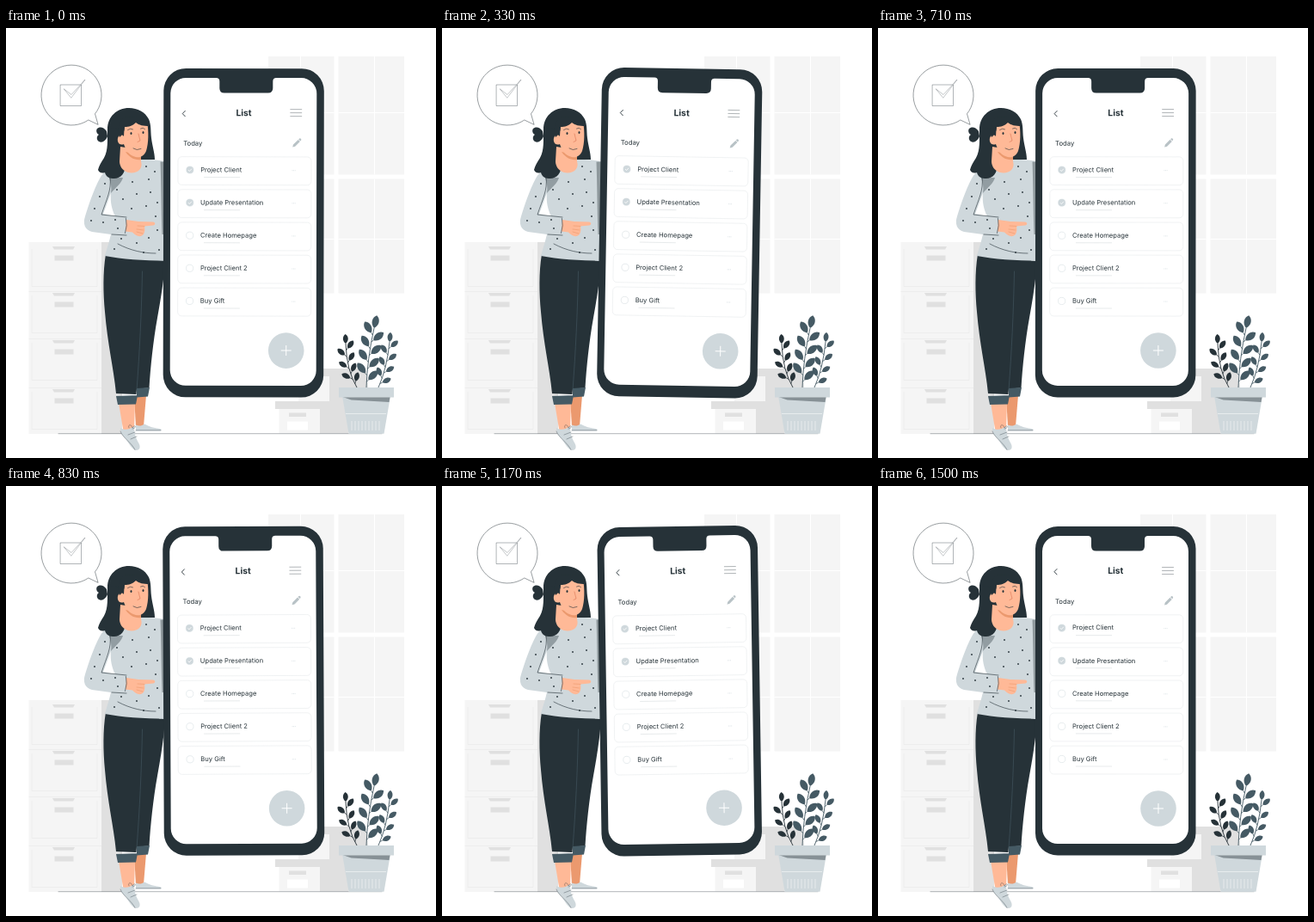
These frames come from a looping animation (500x500 px, 1540 ms). An HTML page:

```html
<!DOCTYPE html>
<html lang="en">
<head>
<meta charset="utf-8">
<title>To-do list</title>
<style>
html, body { margin: 0; width: 100%; height: 100%; overflow: hidden; background: #fff; }
svg { display: block; width: 100vw; height: 100vh; }
text { font: 7.6px Inter, "Open Sans", sans-serif; fill: #263238; text-rendering: geometricPrecision; }
.dark { fill: #263238; }
.slate { fill: #455a64; }
.blue { fill: #cfd8dc; }
.pale { fill: #f5f5f5; }
.grey { fill: #e0e0e0; }
.skin { fill: #ffb997; }
.shade { fill: #eb996e; }
.white { fill: #fff; }
.line { fill: none; stroke: #263238; stroke-width: .6; stroke-linecap: round; stroke-linejoin: round; }
</style>
</head>
<body>
<svg viewBox="0 0 500 500">
  <g id="window"></g>

  <g id="cabinet">
    <path class="grey" d="M111 249h24v223h-24z"/>
    <path class="pale" d="M26.500 249H111v223H26.500z"/>
  </g>

  <g id="boxes">
    <path class="grey" d="M340 396h78l5 38h-83z"/>
    <path class="pale" d="M340 405h36v29h-36z"/>
    <path class="grey" d="M313 434h82v9h-82z"/>
    <path class="pale" d="M317.500 443h48v28.500h-48z"/>
    <path class="grey" d="M365 443h33v28.500h-33zM329 447.500h20v4.500h-20z"/>
    <path class="white" d="M327 457.500h24v10h-24z"/>
  </g>
  <path class="line" stroke-opacity=".6" d="M61 471.700H437"/>

  <g id="plant"></g>
  <g id="pot">
    <path class="blue" d="M391 428h56l-7.500 43.700h-41z"/>
    <path fill="#879196" d="M391.500 429h55l-1 6-44-2.500z"/>
    <path class="blue" d="M387 418h64v11.500h-64z"/>
    <path stroke="#fff" stroke-width=".5" fill="none" d="M395 448.500h47M402 457v11m4-11v11m4-11v11m4-11v11m4-11v11m4-11v11m4-11v11m4-11v11m4-11v11"/>
  </g>

  <g id="bubble">
    <path class="line" style="fill:#fff" stroke-opacity=".8" d="M95.500 107.200A35 35 0 1 1 103.500 99.800L107 112Z"/>
    <path class="line" stroke-opacity=".6" d="M63.500 66h24v24.500h-24z"/>
    <path class="line" style="fill:#fff" stroke-opacity=".45" d="M67.500 71l8.500 6.500L92 60 76 81z"/>
  </g>

  <g id="woman">
    <path class="shade" d="M149 428l14-1-3 36-9 1z"/>
    <path class="skin" d="M131 436h19l-1 32-12 4z"/>
    <path class="blue" d="M151 461.500c4 2 7 1 10-1 5 3 12 5 18 5.500 2 .5 2 2.500 0 2.500H151z"/>
    <path class="blue" d="M133 465c5 3 11 2 16-2 0 8 2 14 5.500 20 2.500 5 .5 8-3 8-5-1-8-7-12-13-4-4-7-8-6.500-13z"/>
    <path class="line" stroke-opacity=".6" d="M151 467.800h29M133 469c3 8 13 13 17 21.500M143 465c-2-4 3-5 4 0 3-5 6 0 0 1M142 473l8-3M145 478l7-3"/>
    <path class="dark" d="M116 263l69 6c-1 22-5 46-9 68-5 28-8 58-9.500 81.500l-14.500 1-.5 6.500-23.500-1c-3-30-10-58-13-95-2-22-2.500-46 1-67z"/>
    <path class="line" style="stroke:#455a64" d="M158.500 283c-1 50-3 92-6.500 138"/>
    <path class="slate" d="M128 428l25-1-2 10.500-21 .5zM152 419l15-1-2 10.500-13 1z"/>

    <path class="dark" d="M118 118c0-15 11-25 25-25 10 0 19 5 23 13 3 7 2 13 3 22 1 9 4 17 4 25h-30l-25-20z"/>
    <path class="blue" d="M135 155c-12 5-22 12-26 20-7 13-13 31-17 44-3 9 0 16 8 18l22 3c-2 9-5 17-7 25 20 4 44 5 72 6v-115c-10-3-18-3-30-3z"/>
    <path fill="#8f999d" d="M179.500 155.500h6V240h-4c-1-27-1-58-2-84.500z"/>
    <path class="white" d="M122 192l-9 24 14 3c-4-8-6-17-5-27z"/>
    <path fill="#929da2" d="M120 174h16c-2 7-8 11-14 18 1-6 0-12-2-18z"/>
    <g id="dots"></g>
    <path class="line" d="M121 174c2 14-4 25-10 43l29 3M123 240l17 1M130 251c15 8 30 11 44 11"/>
    <path class="dark" d="M118 116c0 14 1 26-4 35-3 5-6 9-7 14 2 4 5 4 8 3 1 4 4 7 9 7 9 1 15-6 15-17v-40z"/>
    <path class="dark" d="M117 120c-4-6-9-5-11-3-2 3 0 6 2 7-3 2-3 6 0 8 4 2 8-1 10-6z"/>
    <path class="skin" d="M133 138l24 4v13c3 10-6 15-15 13-7-2-10-8-10-13z"/>
    <path class="shade" d="M139 144c5 7 11 10 18 9v-5z"/>
    <path class="skin" d="M138 109l26-1c2 13 2 25-1 35-3 7-9 9-15 6-6-2-9-8-11-14-5 2-8-2-7-7 1-4 5-5 7-2z"/>
    <path class="dark" d="M132 127c-3-8-1-19 6-24l25 1 4 10c-8 0-12-1-16-4-4 4-8 5-13 5 0 5-2 9-6 12z"/>
    <path class="line" d="M141.500 118.500q3-2.500 6-.7M156.500 117q3-2 5 .5M148 140q4 3 9 .5"/>
    <ellipse class="dark" cx="145.500" cy="122.500" rx="1" ry="1.500"/>
    <ellipse class="dark" cx="159.500" cy="121.500" rx="1" ry="1.500"/>
    <path class="line" style="stroke:#d97552" d="M154 123l2 8-3 1.500"/>

    <path class="skin" d="M140 223l14 2 17 .5c3 .3 3 3.500 0 4l-10 1c1 5 0 9-3 11-4 2-8-1-11-4l-8-1z"/>
    <path class="line" style="stroke:#eb996e" d="M153 230l8 .5M152 234l8 1M152 237l7 2"/>
    <path class="line" d="M139.500 221.500q2 8-1 17"/>
  </g>

  <g id="phone">
    <rect class="dark" x="183" y="47" width="186.500" height="382.500" rx="26"/>
    <path class="white" d="M209 58h35q4 0 4 4v8q0 5.500 5.500 5.500h51q5.500 0 5.500-5.500v-8q0-4 4-4h29a18 18 0 0 1 18 18v322a18 18 0 0 1-18 18H209a18 18 0 0 1-18-18V76a18 18 0 0 1 18-18z"/>
    <path class="line" style="stroke-width:.9" d="M208 96.500l-3 3.200 3 3.200"/>
    <path class="line" stroke-opacity=".6" d="M330.500 94.500h13m-13 4h13m-13 4h13"/>
    <text x="276.300" y="102.300" text-anchor="middle" style="font-size:10.300px;font-weight:700">List</text>
    <text x="206" y="136.800" style="font-size:7.700px">Today</text>
    <path fill="#b8c2c6" d="M333 138.500l.8-3 5.700-5.700 2.200 2.200-5.700 5.700zM340 129.300l1-1q1-.5 1.700.3t.3 1.700l-.9 1z"/>
    <g id="cards"></g>
    <circle class="blue" cx="326" cy="375" r="20.800"/>
    <path stroke="#fff" d="M320 375h12m-6-6v12"/>
  </g>
</svg>

<script>
const SWING = 1540, LEAD = 40;
const byId = id => document.getElementById(id);
const add = (id, markup) => byId(id).insertAdjacentHTML("beforeend", markup);
const rect = (x, y, w, h, attrs) => `<rect x="${x}" y="${y}" width="${w}" height="${h}" ${attrs}/>`;

for (const [x, split] of [[305, 342.5], [386.5, 428.5]]) {
  for (const [y, h, bar] of [[33, 137.5, 98.5], [175.5, 133, 245.5]]) {
    add("window", rect(x, y, 76.5, h, 'class="pale"') +
      `<path stroke="#fff" d="M${split} ${y}v${h}M${x} ${bar}h76.500"/>`);
  }
}

[254, 308, 363, 420].forEach((y, i) => {
  add("cabinet", `<path class="grey" d="M54 ${y}h26l-2 3.500h-22z"/>` +
    rect(56.5, y + 10.5, 22, 6, 'class="grey"') +
    `<path fill="none" stroke="#e8e8e8" stroke-width=".6" d="M30 ${y + 3}v43.500h76v-43.500"/>` +
    (i ? `<path stroke="#e8e8e8" stroke-width=".6" d="M26.500 ${y - 1.500}h84.500"/>` : ""));
});

function leaf(x, y, angle, size) {
  return `<path transform="translate(${x} ${y}) rotate(${angle}) scale(${size})" d="M0 0C.3-.38 .8-.33 1 0C.8.33 .3.38 0 0"/>`;
}

// A curved stem with leaves on alternating sides and one at the tip.
function branch(x0, y0, cx, cy, x1, y1, count, size, color) {
  let markup = `<path d="M${x0} ${y0}Q${cx} ${cy} ${x1} ${y1}" fill="none" stroke="${color}" stroke-width=".9"/>`;
  for (let i = 0; i <= count; i++) {
    const t = .1 + .9 * i / count, s = 1 - t;
    const x = s * s * x0 + 2 * s * t * cx + t * t * x1;
    const y = s * s * y0 + 2 * s * t * cy + t * t * y1;
    const dx = s * (cx - x0) + t * (x1 - cx), dy = s * (cy - y0) + t * (y1 - cy);
    const turn = i === count ? 0 : i % 2 ? -42 : 42;
    const angle = Math.atan2(dy, dx) + turn * Math.PI / 180;
    const stalk = turn ? 3 : 0;
    const lx = x + stalk * Math.cos(angle), ly = y + stalk * Math.sin(angle);
    markup += `<path d="M${x} ${y}L${lx} ${ly}" stroke="${color}" stroke-width=".8"/>` +
      leaf(lx, ly, angle * 180 / Math.PI, size);
  }
  add("plant", `<g fill="${color}">${markup}</g>`);
}
branch(408, 418, 396, 398, 395, 367, 7, 11, "#263238");
branch(433, 418, 443, 396, 446, 365, 7, 11, "#455a64");
branch(419, 418, 420, 385, 428, 349, 8, 15, "#455a64");

const dots = [163, 161, 173, 167, 147, 179, 166, 176, 129, 188, 136, 199, 152, 193, 168, 191, 115, 181,
  109, 196, 103, 210, 146, 210, 163, 207, 176, 203, 99, 224, 113, 226, 127, 223, 174, 219, 176, 235,
  130, 233, 134, 245, 166, 244, 152, 250, 126, 257, 178, 258, 160, 261];
for (let i = 0; i < dots.length; i += 2)
  add("dots", `<circle class="dark" cx="${dots[i]}" cy="${dots[i + 1]}" r=".9"/>`);

["Project Client", "Update Presentation", "Create Homepage", "Project Client 2", "Buy Gift"].forEach((label, i) => {
  const y = 149.8 + 38.1 * i, mid = y + 15.3, done = i < 2;
  add("cards", rect(199.8, y, 155, 32.8, 'rx="4.500" fill="none" stroke="#e6e9eb" stroke-width=".6"') +
    `<circle cx="213.700" cy="${mid}" r="4.100" fill="${done ? "#cfd8dc" : "none"}" stroke="#cfd8dc" stroke-width=".5"/>` +
    (done ? `<path d="M211.800 ${mid}l1.500 1.500 2.500-2.800" fill="none" stroke="#fff" stroke-width=".8"/>` : "") +
    `<text x="226" y="${mid + 2.4}">${label}</text>` +
    `<path d="M230 ${mid + 8.5}h42" stroke="#dde1e3" stroke-width=".7"/>` +
    `<path d="M332.500 ${mid + .5}h4" stroke="#cfd8dc" stroke-width=".8" stroke-dasharray=".8 .8"/>`);
});

// Straight-line swing: 0 to 1 degree, down to -1, back to 0.
function tilt(p) {
  return p < .25 ? 4 * p : p < .75 ? 2 - 4 * p : 4 * p - 4;
}

function draw(now) {
  const p = (now + LEAD) / SWING % 1;
  byId("phone").setAttribute("transform", `rotate(${tilt(p)} 276.250 238.250)`);
  requestAnimationFrame(draw);
}
draw(0);
</script>
</body>
</html>
```
